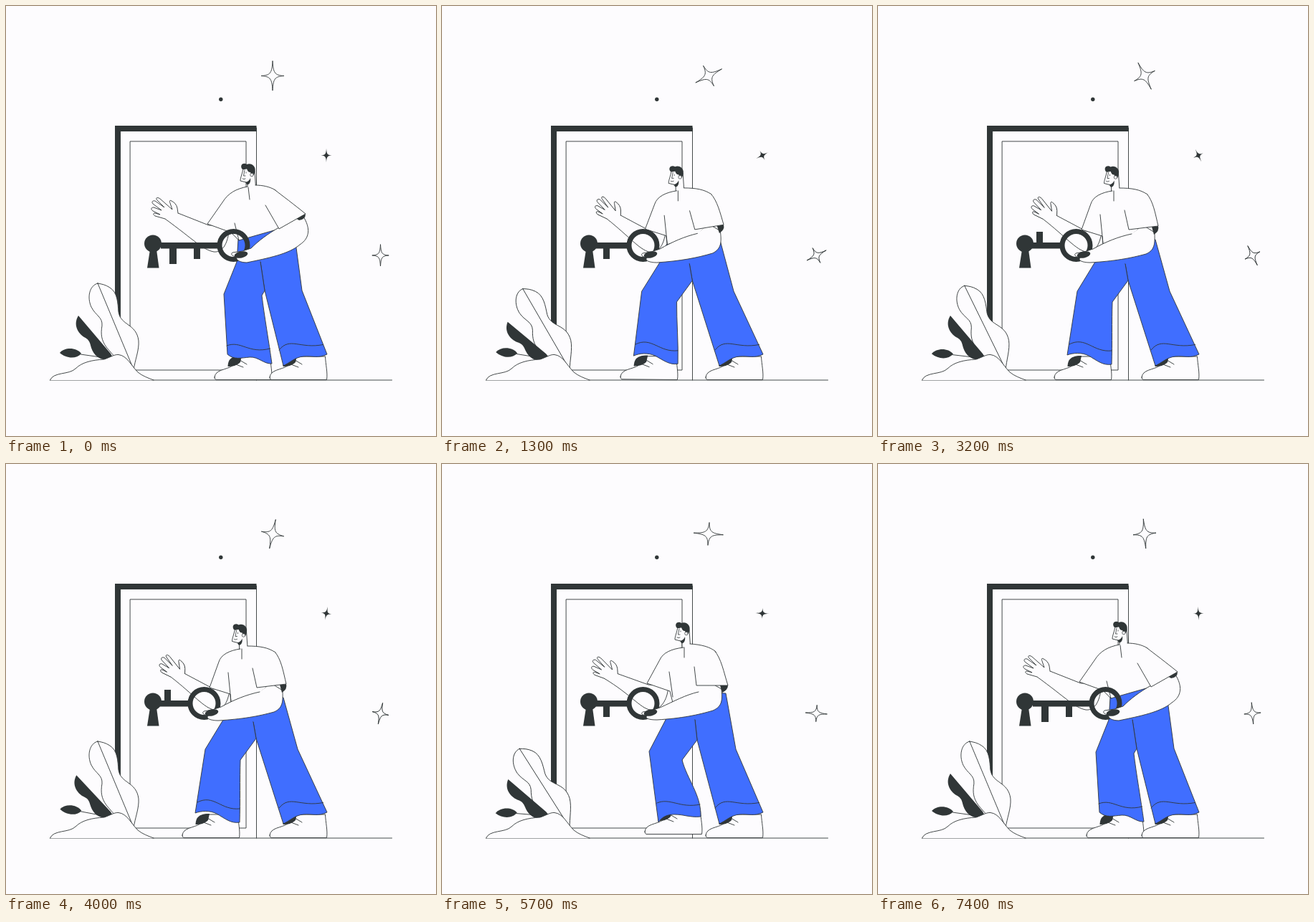
An HTML page that plays this animation: 600x600 px, repeating every 7500 ms.

```html
<!DOCTYPE html>
<html lang="en">
<head>
<meta charset="utf-8">
<title>Key and door</title>
<style>
html, body { margin: 0; width: 100%; height: 100%; overflow: hidden; background: #fdfcfe; }
svg { display: block; width: 100vw; height: 100vh; stroke: #303637; stroke-width: .9; stroke-linejoin: round; stroke-linecap: round; fill: #fdfcfe; }
.dark { fill: #303637; stroke: none; }
.blue { fill: #406eff; }
.line { fill: none; }
.star { vector-effect: non-scaling-stroke; }
</style>
</head>
<body>
<svg viewBox="0 0 600 600">
  <defs>
    <path id="starShape" class="star" d="M0-20.5C1-4.500 2.500-.8 16 0C2.500.8 1 4.500 0 20.5C-1 4.500-2.500.8-16 0C-2.500-.8-1-4.500 0-20.5Z"/>
    <g id="shoe">
      <path d="M291 518C292 507 307 508 316 502L323 489H368.500C369 500 372 512 370.500 521.500H293Q291 521 291 518Z"/>
      <path class="dark" d="M309.500 503C310 494 313 488 329 488L327 497C322 502 316 503 309.500 503Z"/>
      <path class="line" d="M318 499L331 504M326 494L336 500"/>
    </g>
    <clipPath id="inFront"><rect x="206" y="280" width="300" height="120"/></clipPath>
  </defs>

  <!-- door and ground -->
  <path class="dark" d="M152 167H349.500V175H160V522H152Z"/>
  <path class="line" d="M349.500 170V522M173.500 188.900H335V508H173.500ZM61.500 522H538.500"/>
  <circle class="dark" cx="299.800" cy="130.300" r="2.700"/>
  <g class="dark"><circle cx="205" cy="331.500" r="12"/><path d="M201 340H210L213.500 365.500H197Z"/></g>

  <!-- stars -->
  <g id="star1"><use href="#starShape"/></g>
  <g id="star2" fill="#303637" stroke="none"><use href="#starShape"/></g>
  <g id="star3"><use href="#starShape"/></g>

  <!-- plant -->
  <g id="bigLeaf">
    <path d="M128 387C116 390 113 407 119 420C125 432 135 434 134 446C132 458 133 466 140 476C150 488 160 500 178 508C180 494 186 480 185 467C182 443 160 446 157 427C156 415 156 400 145 393C139 389 134 388 128 387Z"/>
    <path class="line" d="M128 387L178 507"/>
  </g>
  <path id="darkLeaf" class="dark" d="M101 432C93 445 101 457 109 462C117 466 117 470 119 477C123 490 135 497 150 492L146 485Z"/>
  <g id="smallLeaf">
    <path class="line" d="M104 486L132 490"/>
    <path class="dark" d="M75 484C82 476 98 476 105 485C98 493 84 492 75 484Z"/>
  </g>
  <path d="M61.500 522C66 510 88 515 97 506C106 497 120 494 137 493C146 490 151 486 157 486.500C169 488 174 501 184 511C190 516 198 519 206 522"/>

  <!-- person -->
  <g id="frontShoe"><use href="#shoe"/></g>
  <use href="#shoe" x="77"/>
  <path id="backLeg" class="blue"/>
  <path id="frontLeg" class="blue"/>
  <path id="cuff" class="line"/>
  <path class="line" d="M381 480C396 461 410 479 442.500 472.500"/>
  <path id="farArm"/>
  <g id="hand">
    <path d="M240 289L239 282C238 277 235 274 231 272C228 270 228 273 229 275L232 284L215 269C211 266 208 268 211 271L221 281L208 272C204 271 203 274 205 276L217 285L206 281C202 281 202 284 205 286L215 291L208 289C205 289 205 291 208 293L222 297"/>
  </g>
  <g id="head">
    <path d="M331 226C330 234 327 239 327 244L335 246L337 248V260H349L347 230Z"/>
    <path class="dark" d="M329 227C326 221 332 218 336 221C342 218 349 224 347.500 230C347 235 345 237 343 237L341 232C338 232 337 230 336 227C334 228 331 229 329 227ZM334 245.500C337 246 340 243 341 240C342 246 339 250 336 249Z"/>
    <circle cx="343" cy="235.500" r="2.300" stroke-width=".7"/>
    <path class="line" stroke-width=".8" d="M333 229L331.500 237L334 237M330 241Q332 242.500 334 241M335 232V233"/>
  </g>
  <path id="shirt"/>
  <path id="folds" class="line"/>
  <g clip-path="url(#inFront)">
    <g id="key">
      <path class="dark" d="M216 330H300V338.500H216Z"/>
      <path id="teeth" class="dark" d="M228 0H238V26H228ZM262 0H271V19H262Z"/>
      <circle class="line" cx="317.500" cy="334" r="19.500" stroke-width="7"/>
    </g>
  </g>
  <path id="nearArm"/>
  <g id="grip"><ellipse class="dark" cx="328" cy="347" rx="9.500" ry="4.500" transform="rotate(-12 328 347)"/></g>
  <path id="cuffShade" class="dark"/>
  <path id="sleeve"/>
</svg>
<script>
const LOOP = 7500;
const $ = id => document.getElementById(id);
const hem = 'L448 486C436 492 428 488 415 489C403 490 396 498 387 502';

// Poses per part: rest, step forward, key in lock, step back, and optionally lowered arm.
const poses = {
  frontShoe: [
    'translate(0 0) rotate(0 371 521)',
    'translate(-12 0) rotate(6 371 521)',
    'translate(-45 0) rotate(0 371 521)',
    'translate(-8 -5) rotate(0 371 521)'],
  backLeg: [
    `M324 326L380 310L404 330L413 397${hem}L361 397L355 357L322 357`,
    `M316 331L381 311L397 330L407 398${hem}L352 384L348 357L318 357`,
    `M313 333L356 318L387 326L407 398${hem}L349 383L345 360L303 357`,
    `M320 333L360 318L396 320L410 398${hem}L356 385L353 357L312 357`],
  frontLeg: [
    'M324 326L322 357L304 402L309 486C318 494 328 491 340 490C352 489 360 500 371 499C367 470 360 430 357 404L361 397L355 357',
    'M316 331L318 357L285 400L302 500C310 488 322 488 336 490C346 492 354 492 361 492C361 465 340 440 333 412L352 385L348 357',
    'M313 333L303 357L278 398L264 487C272 484 284 483 294 488C306 495 314 502 326 500C327 470 326 440 327 413L349 383L345 360',
    'M320 333L312 357L289 401L302 500C310 488 322 488 336 490C346 492 354 493 361 492C362 462 342 440 335 413L356 385L353 357'],
  cuff: [
    'M308 474C328 466 338 486 368.5 478',
    'M299 474C316 465 332 484 359 479',
    'M267 472C290 460 300 484 326 481',
    'M300 473C318 465 332 481 360 475'],
  farArm: [
    'M240 289L283 306L312 306C310 336 300 344 290 343C274 340 262 326 222 297',
    'M246 286.5L282 307L312 308C310 340 298 350 288 347C272 342 262 326 228 293.5',
    'M249.600 292.600L290 314L312 314C310 336 300 345 290 343C276 340 262 322 230.400 297.400',
    'M245 292.600L288 308L316 310C314 336 300 345 290 343C276 340 264 322 226.700 299.400'],
  hand: [
    'translate(0 0) rotate(0 231 293)',
    'translate(6 -3) rotate(3 231 293)',
    'translate(9 2) rotate(10 231 293)',
    'translate(5 3) rotate(4 231 293)'],
  head: ['translate(0 0)', 'translate(-4 2)', 'translate(-11.5 3.5)', 'translate(-2 1)'],
  shirt: [
    'M337 252C321 255 310 261 302 274L281 304L314 316L325 327L381 311L400 290L376 257C368 252 358 250 348 250',
    'M333 256C314 260 303 266 296 276L278 304L310 316L317 331L381 311L398 290L375 260C366 255 356 253 345 253',
    'M327 258C312 260 300 266 297 276L284 312L313 321L314 333L352 321L376 300L376 263C366 256 354 254 337 254',
    'M337 256C319 258 308 264 304 273L286 306L318 317L322 333L358 321L384 300L382 262C374 255 362 252 346 251'],
  folds: [
    'M319 303L325 327M338 253L340 270',
    'M312 305L317 331M333 257L333 271',
    'M310 291L314 332M329 258L329 272',
    'M317 290L322 325M338 256L338 270'],
  key: ['translate(0 0)', 'translate(3.5 0)', 'translate(-41 0)', 'translate(-37 0)'],
  grip: ['translate(0 0)', 'translate(3.5 0)', 'translate(-41 0)', 'translate(-37 0)', 'translate(-41 2)'],
  nearArm: [
    'M381 309C365 318 352 328 342 338L330 342L316 344C312 347 318 350 322 350C320 355 328 358 336 358C365 352 395 346 410 333C424 324 425 310 415 294L400 288',
    'M381 311C366 320 356 330 345 339L333 343L319 345C316 348 321 351 325 351C323 356 331 358 339 358C366 353 395 346 412 335C427 324 426 304 412 291L398 288',
    'M354 318C335 322 318 329 300 339L288 343L276 345C272 348 278 351 282 351C278 356 288 358 296 358C330 356 352 352 374 346C388 340 386 328 386 316L370 306',
    'M358 318C340 322 324 331 304 340L292 344L280 346C276 349 282 351 286 351C282 356 292 357 300 357C334 355 358 350 378 344C392 338 391 328 390 314L376 306',
    'M357 320C340 327 322 334 300 342L288 346L276 347C272 350 278 353 282 353C278 358 290 361 298 361C330 359 352 354 374 347C388 340 386 328 386 316L370 306'],
  cuffShade: [
    'M404 296L418 290Q418 298 409 299Z',
    'M401 294L414 287Q414 294 407 296Z',
    'M382 308L391 307Q393 314 385 319Z',
    'M388 309L399 309Q399 315 391 319Z'],
  sleeve: [
    'M375 256.5C386 265 402 277 418 290L381 311L362 278',
    'M373 259C386 266 400 276 414 287L381 311L361 293',
    'M375 262C384 272 387 290 391 307L350 312L344 285',
    'M380 260C390 272 393 290 399 309L355 309L352 283']
};

const smooth = k => (1 - Math.cos(Math.PI * k)) / 2;
const easeIn = k => k * k;
const easeOut = k => k * (2 - k);

// Each step: start time, pose to leave from, easing towards the next step.
const steps = [
  [0, 0, easeIn], [600, 1, easeOut], [1600, 2, smooth], [4200, 2, smooth],
  [4900, 4, smooth], [5700, 3, smooth], [6500, 0, smooth], [LOOP, 0, smooth]
];

function mix(a, b, k) {
  const number = /-?\d+(\.\d+)?/g, ends = b.match(number);
  let i = 0;
  return a.replace(number, n => (+n + (ends[i++] - n) * k).toFixed(2));
}

function track(t, ...keys) {
  const i = keys.findIndex(key => key[0] > t);
  const [t0, v0] = keys[i - 1], [t1, v1] = keys[i];
  return v0 + (v1 - v0) * smooth((t - t0) / (t1 - t0));
}

const move = (id, value) => $(id).setAttribute('transform', value);

function draw(t) {
  const i = steps.findIndex(step => step[0] > t);
  const [t0, from, ease] = steps[i - 1], [t1, to] = steps[i];
  const k = ease((t - t0) / (t1 - t0));
  for (const [id, list] of Object.entries(poses)) {
    const pick = n => list[n] ?? list[2];
    $(id).setAttribute($(id).tagName === 'path' ? 'd' : 'transform', mix(pick(from), pick(to), k));
  }

  const turn = track(t, [0, 0], [2400, 0], [3100, 1], [4000, 1], [4700, 0], [LOOP, 0]);
  move('teeth', `translate(0 334) scale(1 ${Math.cos(Math.PI * turn)})`);

  const spin = 360 * t / LOOP;
  move('star1', `translate(372 97.500) rotate(${spin})`);
  move('star2', `translate(447 208.500) rotate(${spin}) scale(.47)`);
  move('star3', `translate(522.500 348) rotate(${spin}) scale(.73)`);

  const big = track(t, [0, 0], [1950, -10], [4050, 0], [5850, -10], [LOOP, 0]);
  const dark = track(t, [0, 0], [1300, -10], [3300, 0], [5300, -10], [LOOP, 0]);
  const small = track(t, [0, 0], [700, 3], [2400, -4], [4300, 3], [6000, -4], [LOOP, 0]);
  move('bigLeaf', `rotate(${big} 178 507)`);
  move('darkLeaf', `rotate(${dark} 147 490)`);
  move('smallLeaf', `rotate(${small} 130 491)`);
}

const start = performance.now();
function frame() {
  draw((performance.now() - start) % LOOP);
  requestAnimationFrame(frame);
}
frame();
</script>
</body>
</html>
```
